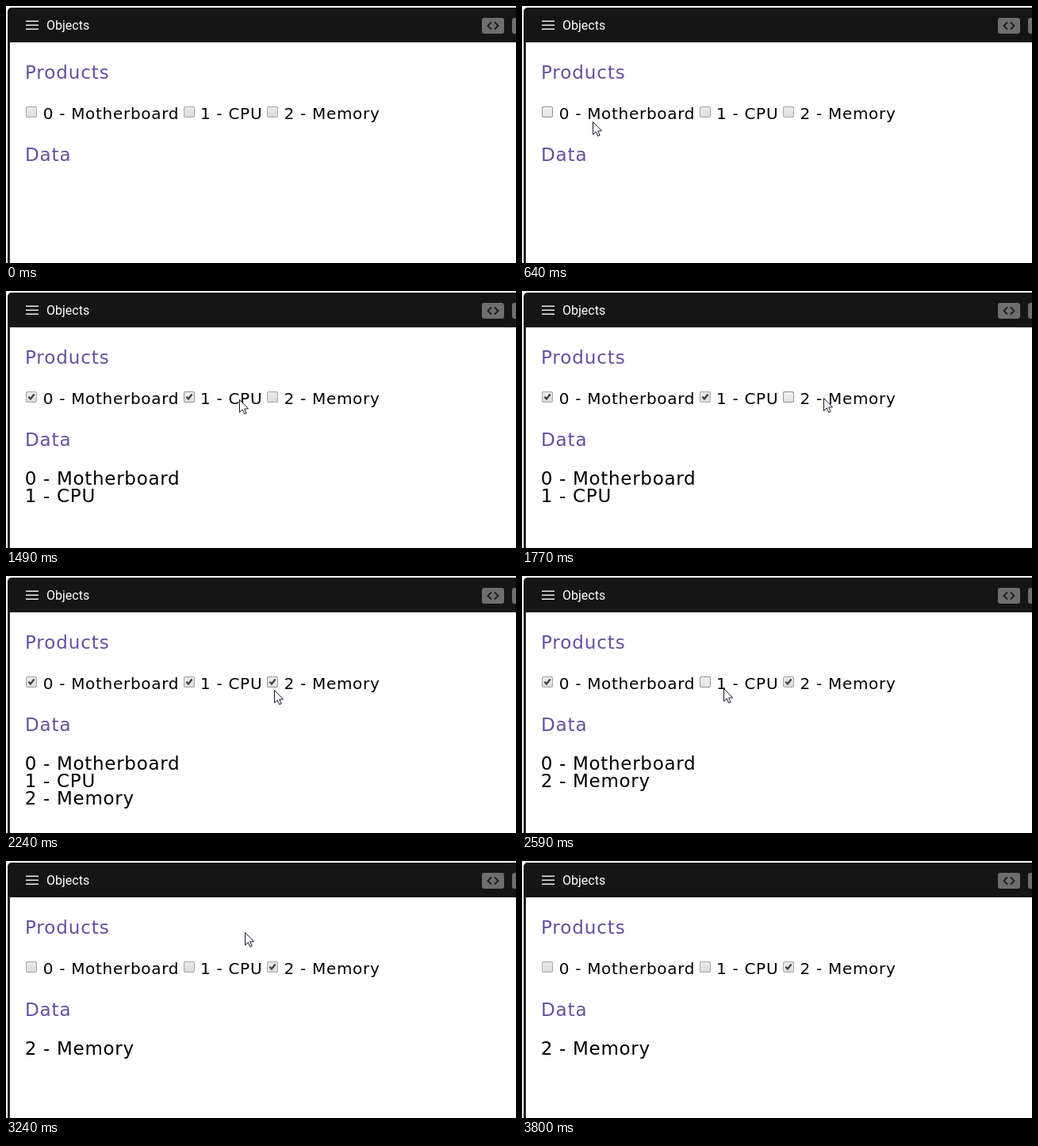
These frames come from a looping animation (643 px wide and 325 px high, 4.83 s). An HTML page with a canvas:

```html
<!DOCTYPE html>
<html lang="en">
<head>
<meta charset="utf-8">
<title>Objects</title>
<style>
  html, body { margin: 0; width: 100%; height: 100%; overflow: hidden; background: #fff; }
  canvas { display: block; }
</style>
</head>
<body>
<canvas id="stage" width="643" height="325"></canvas>
<script>
const ctx = document.getElementById('stage').getContext('2d');
const LOOP = 4830;
const BODY_FONT = '"DejaVu Sans", sans-serif';

const products = [
  { name: '0 - Motherboard', box: 25, text: 46.7, end: 217 },
  { name: '1 - CPU', box: 224, text: 245, end: 322 },
  { name: '2 - Memory', box: 329, text: 350.5, end: 471 }
];

// Time and product index of each click
const clicks = [[800, 0], [1350, 1], [1900, 2], [2450, 1], [3010, 0]];

// Bursts of movement: start, end, number of screen updates
const bursts = [
  [150, 640, 8], [800, 1280, 7], [1350, 1770, 7], [1900, 2380, 7],
  [2450, 2940, 8], [3010, 3520, 8], [3590, 3800, 4]
];

const linear = p => p;
const easeIn = p => p * p;
const easeOut = p => 1 - (1 - p) ** 2;
const easeInOut = p => p * p * (3 - 2 * p);

// Pointer path: time, x, y, easing towards this point
const path = [
  [150, 527, 1, linear],
  [640, 89, 146, easeOut],
  [800, 89, 146, linear],
  [1120, 236, 135, easeInOut],
  [1280, 264, 138, easeOut],
  [1350, 264, 138, linear],
  [1770, 380, 135, easeInOut],
  [1900, 381, 136, linear],
  [2220, 338, 144, easeIn],
  [2380, 283, 146, easeOut],
  [2450, 283, 146, linear],
  [2800, 200, 134, easeInOut],
  [2940, 165, 137, easeOut],
  [3010, 165, 137, linear],
  [3520, 511, 18, easeInOut],
  [3730, 579, 1, linear]
];

function snap(t) {
  let time = 0;
  for (const [start, end, count] of bursts) {
    if (t < start) break;
    const step = (end - start) / (count - 1);
    time = Math.min(end, start + Math.floor((t - start) / step + 1e-6) * step);
  }
  return time;
}

function pointerAt(t) {
  if (t < 150 || t >= 3800) return null;
  const i = path.findIndex(key => key[0] >= t - 1e-6);
  if (i < 0) return null;
  const [t1, x1, y1, ease] = path[i];
  if (i === 0) return { x: x1, y: y1 };
  const [t0, x0, y0] = path[i - 1];
  const p = ease((t - t0) / (t1 - t0));
  return { x: Math.round(x0 + (x1 - x0) * p), y: Math.round(y0 + (y1 - y0) * p) };
}

function write(str, x, y, size, color, spacing, family = BODY_FONT) {
  ctx.font = `${size}px ${family}`;
  ctx.letterSpacing = `${spacing}px`;
  ctx.fillStyle = color;
  ctx.fillText(str, x, y);
}

function fillRound(x, y, w, h, r, color) {
  ctx.fillStyle = color;
  ctx.beginPath();
  ctx.roundRect(x, y, w, h, r);
  ctx.fill();
}

function polyline(points, width, color) {
  ctx.beginPath();
  points.forEach(([x, y]) => ctx.lineTo(x, y));
  ctx.lineWidth = width;
  ctx.strokeStyle = color;
  ctx.stroke();
}

function drawFrame() {
  ctx.fillStyle = '#fff';
  ctx.fillRect(0, 0, 643, 325);
  fillRound(2, 2, 660, 340, 5, '#1d2124');
  ctx.fillStyle = '#fff';
  ctx.fillRect(5, 46, 638, 279);
  fillRound(3, 3, 660, 42, [4, 0, 0, 0], '#151515');

  ctx.fillStyle = '#eee';
  for (const y of [18.5, 23.5, 28.5]) ctx.fillRect(25, y, 16, 1.5);
  write('Objects', 51, 30, 16, '#fff', 0, 'Roboto, sans-serif');

  fillRound(600, 15, 28, 20, 3, '#6e6e6e');
  fillRound(638, 15, 28, 20, 3, '#6e6e6e');
  polyline([[612, 20.5], [607.5, 25], [612, 29.5]], 1.8, '#1c1c1c');
  polyline([[616, 20.5], [620.5, 25], [616, 29.5]], 1.8, '#1c1c1c');
}

function drawCheckbox(x, y, checked, hover) {
  const shade = ctx.createLinearGradient(0, y, 0, y + 14);
  shade.addColorStop(0, hover ? '#f2f2f2' : '#ededed');
  shade.addColorStop(1, hover ? '#e2e2e2' : '#dadada');
  fillRound(x, y, 14, 14, 2, hover ? '#929292' : '#a6a6a6');
  fillRound(x + 1, y + 1, 12, 12, 1.5, shade);
  if (checked) polyline([[x + 3.4, y + 6.8], [x + 5.9, y + 9.5], [x + 10.6, y + 3.5]], 2.3, '#404040');
}

function drawPointer({ x, y }) {
  const outline = [[0, 0], [0, 16], [3.7, 12.5], [6.2, 18], [8.6, 17], [6.2, 11.6], [11, 11.4]];
  ctx.beginPath();
  outline.forEach(([dx, dy]) => ctx.lineTo(x + 0.5 + dx, y + 0.5 + dy));
  ctx.closePath();
  ctx.fillStyle = '#fff';
  ctx.fill();
  ctx.lineWidth = 1;
  ctx.strokeStyle = '#16162a';
  ctx.stroke();
}

function draw(t) {
  const time = snap(t);
  const pointer = pointerAt(time);
  const checked = products.map((_, i) =>
    clicks.filter(([at, index]) => index === i && at <= time).length % 2 === 1);

  drawFrame();
  write('Products', 24, 92, 23, '#6650a0', 0.9);
  write('Data', 24, 196, 23, '#6650a0', 0.9);

  products.forEach(({ name, box, text, end }, i) => {
    const hover = pointer && pointer.x >= box && pointer.x <= end &&
      pointer.y >= 121 && pointer.y <= 148;
    drawCheckbox(box, 127, checked[i], hover);
    write(name, text, 143, 20, '#000', 0.7);
  });

  products.filter((_, i) => checked[i]).forEach(({ name }, row) =>
    write(name, 23.7, 245 + row * 22, 23, '#000', 0.7));

  if (pointer) drawPointer(pointer);
}

const began = performance.now();
function tick() {
  draw((performance.now() - began) % LOOP);
  requestAnimationFrame(tick);
}
tick();
</script>
</body>
</html>
```
